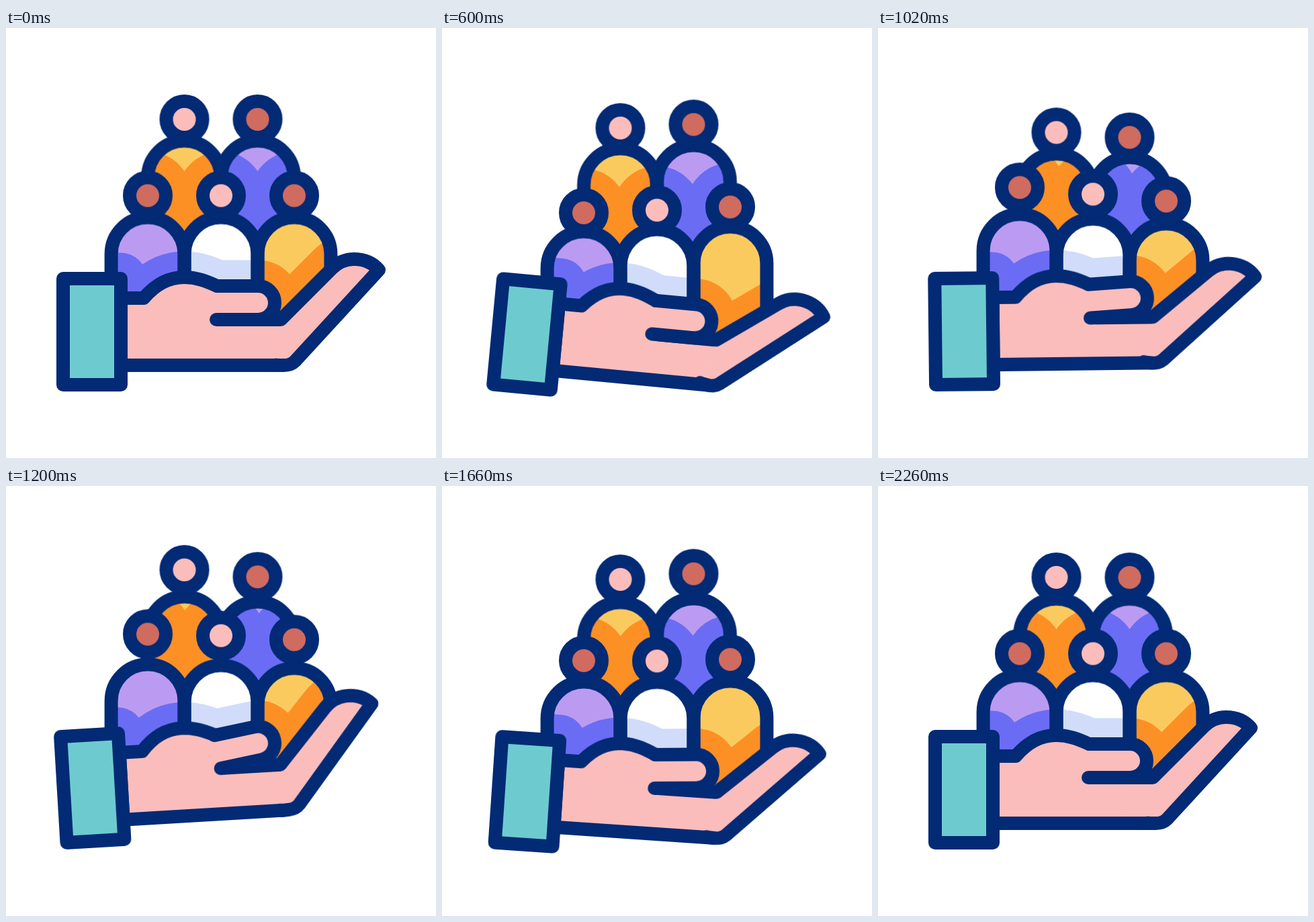
An HTML page without scripts for the animation above (2.4 s loop, 640 by 640 pixels).

```html
<!DOCTYPE html>
<html lang="en">
<head>
<meta charset="utf-8">
<title>Community in hand</title>
<style>
  html, body { margin: 0; width: 100%; height: 100%; overflow: hidden; background: #fff; }
  svg { display: block; width: 100%; height: 100%; }

  .line { stroke: #032a75; stroke-width: 20; stroke-linecap: round; stroke-linejoin: round; }
  .reach { fill: #fff; stroke: #fff; stroke-width: 77; stroke-linecap: round; stroke-linejoin: round; }
  .outline { fill: none; }

  .head, .body, .palm, .finger, .thumb {
    animation: bob 2400ms cubic-bezier(.333, 0, .667, 1) infinite;
  }
  .head { --down: 28.5px; --up: -29px; --settle: 11px; }
  .body { --down: 23.5px; --up: -16.5px; --settle: 10px; }
  .head.back { --down: 31px; --up: -28.6px; --settle: 11.6px; }
  .body.back { --down: 27.7px; --up: -16px; --settle: 11px; }

  /* the wave runs through the group one person after another */
  .p2 { animation-delay: 60ms; }
  .p3 { animation-delay: 120ms; }
  .p4 { animation-delay: 180ms; }
  .p5 { animation-delay: 240ms; }

  .palm { animation-name: tilt; transform-origin: 85px 438px; }
  .finger { animation-name: curl; transform-origin: 409px 434px; }
  .thumb { animation-name: lift; transform-origin: 318px 386px; }

  @keyframes bob {
    0%, 8.333% { transform: translateY(0); }
    29.167% { transform: translateY(var(--down)); }
    50% { transform: translateY(var(--up)); }
    66.667% { transform: translateY(var(--settle)); }
    85%, 100% { transform: translateY(0); }
  }
  @keyframes tilt {
    0%, 8.333% { transform: rotate(0deg); }
    29.167% { transform: rotate(6deg); }
    50% { transform: rotate(-3.4deg); }
    70.833% { transform: rotate(4deg); }
    91.667%, 100% { transform: rotate(0deg); }
  }
  @keyframes curl {
    0%, 8.333% { transform: rotate(0deg); }
    33.333% { transform: rotate(12.6deg); }
    58.333% { transform: rotate(-9deg); }
    76.667% { transform: rotate(9.2deg); }
    94.167%, 100% { transform: rotate(0deg); }
  }
  @keyframes lift {
    0%, 33.333% { transform: rotate(0deg); }
    58.333% { transform: rotate(-11.6deg); }
    76.667%, 100% { transform: rotate(0deg); }
  }
</style>
</head>
<body>
<svg viewBox="0 0 640 640">
  <defs>
    <circle id="head" r="27"/>
    <path id="body" d="M-54.4 124V0A54.4 54.4 0 0 1 54.4 0V79"/>
    <rect id="cuff" x="85" y="373" width="86" height="158"/>
    <path id="palm" d="M409 502H171V402H205C222 382 242 371 265 371C284 371 299 377 314 384M325 434H409"/>
    <path id="finger" d="M409 434L485 358Q499 344 518 344Q541 344 555 360L430 496Q424 502 414 502A68 68 0 0 1 402 501.6"/>
    <path id="thumb" d="M314 384H375A25 25 0 0 1 375 434H313"/>

    <!-- shade falls wherever the shapes in front come close -->
    <mask id="nearFront" maskUnits="userSpaceOnUse" x="0" y="0" width="640" height="640">
      <g class="reach">
        <use href="#body" x="211" y="336.4" class="body"/>
        <use href="#body" x="320" y="336.4" class="body p2"/>
        <use href="#body" x="429" y="336.4" class="body p3"/>
        <use href="#head" x="211" y="249.5" class="head"/>
        <use href="#head" x="320" y="249.5" class="head p2"/>
        <use href="#head" x="429" y="249.5" class="head p3"/>
      </g>
    </mask>
    <mask id="nearHand" maskUnits="userSpaceOnUse" x="0" y="0" width="640" height="640">
      <g class="reach palm">
        <path d="M314 384L409 434V502Z"/>
        <use href="#palm"/>
        <use href="#finger" class="finger"/>
        <use href="#thumb" class="thumb"/>
        <use href="#cuff"/>
      </g>
    </mask>
  </defs>

  <!-- back row -->
  <use href="#body" x="265.5" y="222.4" class="body back p4" fill="#fbca5f"/>
  <use href="#body" x="374.5" y="222.4" class="body back p5" fill="#bb9bf1"/>
  <g mask="url(#nearFront)">
    <use href="#body" x="265.5" y="222.4" class="body back p4" fill="#fc9024"/>
    <use href="#body" x="374.5" y="222.4" class="body back p5" fill="#6b6cf4"/>
  </g>
  <g class="line">
    <use href="#body" x="265.5" y="222.4" class="body back p4 outline"/>
    <use href="#body" x="374.5" y="222.4" class="body back p5 outline"/>
    <use href="#head" x="265.5" y="136" class="head back p4" fill="#fbbdbb"/>
    <use href="#head" x="374.5" y="136" class="head back p5" fill="#d06b60"/>
  </g>

  <!-- front row -->
  <use href="#body" x="211" y="336.4" class="body" fill="#bb9bf1"/>
  <use href="#body" x="320" y="336.4" class="body p2" fill="#fff"/>
  <use href="#body" x="429" y="336.4" class="body p3" fill="#fbca5f"/>
  <g mask="url(#nearHand)">
    <use href="#body" x="211" y="336.4" class="body" fill="#6b6cf4"/>
    <use href="#body" x="320" y="336.4" class="body p2" fill="#d0dcf9"/>
    <use href="#body" x="429" y="336.4" class="body p3" fill="#fc9024"/>
  </g>
  <g class="line">
    <use href="#body" x="211" y="336.4" class="body outline"/>
    <use href="#body" x="320" y="336.4" class="body p2 outline"/>
    <use href="#body" x="429" y="336.4" class="body p3 outline"/>
    <use href="#head" x="211" y="249.5" class="head" fill="#d06b60"/>
    <use href="#head" x="320" y="249.5" class="head p2" fill="#fbbdbb"/>
    <use href="#head" x="429" y="249.5" class="head p3" fill="#d06b60"/>
  </g>

  <!-- hand -->
  <g class="line palm" fill="#fbbdbb">
    <path d="M314 384L409 434V502Z" stroke="none" style="stroke: none"/>
    <use href="#palm"/>
    <path d="M314 390L409 434V492L325 470Z" style="stroke: none"/>
    <path d="M325 434H409"/>
    <use href="#finger" class="finger"/>
    <use href="#thumb" class="thumb"/>
    <use href="#cuff" fill="#6dcbd0"/>
  </g>
</svg>
</body>
</html>
```
